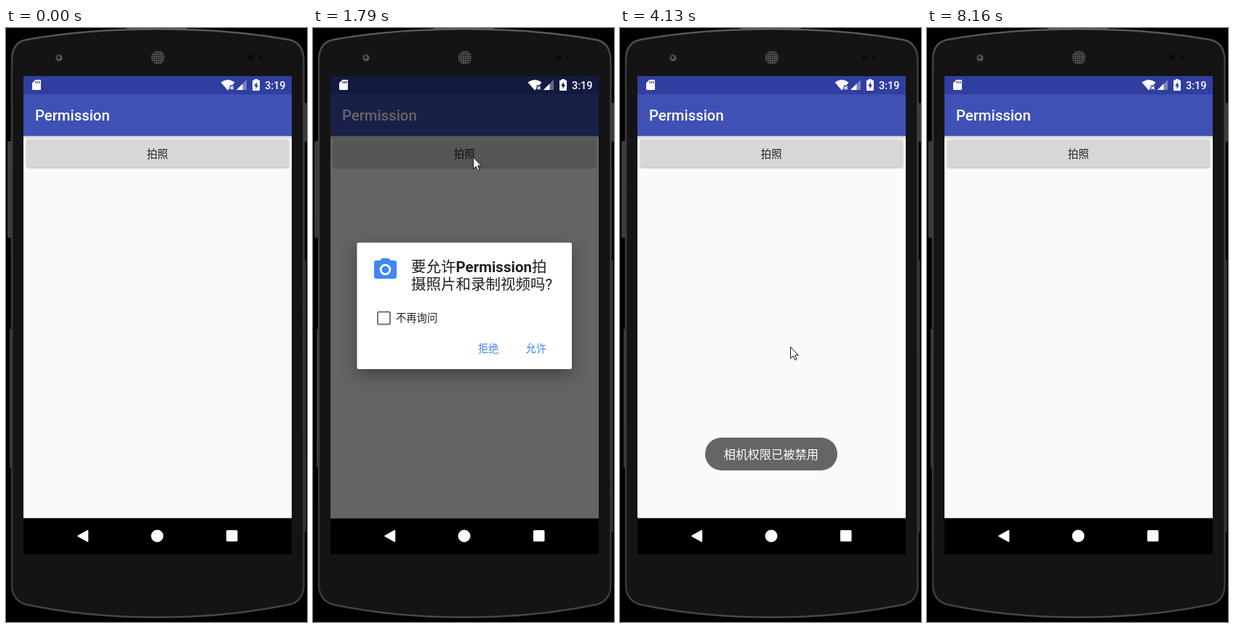
Write an HTML page that moves like this. It is 414 by 815 pixels and loops after 8.47 s.

```html
<!DOCTYPE html>
<html lang="zh-CN">
<head>
<meta charset="utf-8">
<title>Permission</title>
<style>
  html, body { margin: 0; width: 100%; height: 100%; overflow: hidden; background: #000; }
  svg { display: block; width: 414px; height: 815px; }
  text { font-family: Roboto, "Noto Sans CJK SC", "Noto Sans CJK", sans-serif; fill: #212121; }
  .medium { font-weight: 500; }
  .center { text-anchor: middle; }
  .white { fill: #fff; }
  .blue { fill: #4285f4; }
  .small { font-size: 14.3px; }
  .heading { font-size: 20.5px; }
  .toast text { font-size: 16.3px; fill: #fff; }
  .toast rect { fill: #656565; }
  .shadow { filter: drop-shadow(0 1px 1px rgba(0, 0, 0, .3)); }
  #lift { filter: drop-shadow(0 2px 2px rgba(0, 0, 0, .4)); }
  #dialog .sheet { filter: drop-shadow(0 8px 11px rgba(0, 0, 0, .34)); }
</style>
</head>
<body>
<svg viewBox="0 0 414 815">
  <defs>
    <linearGradient id="fall" x2="0" y2="1">
      <stop stop-opacity=".22"/><stop offset="1" stop-opacity="0"/>
    </linearGradient>
    <linearGradient id="rim" x2="0" y2="1">
      <stop stop-color="#5a5a5a"/><stop offset=".06" stop-color="#3e3e3e"/>
      <stop offset=".94" stop-color="#363636"/><stop offset="1" stop-color="#484848"/>
    </linearGradient>
    <pattern id="mesh" width="3" height="3" patternUnits="userSpaceOnUse">
      <rect width="3" height="3" fill="#565656"/><circle cx="1.5" cy="1.5" r="1.05" fill="#111"/>
    </pattern>
    <clipPath id="photoClip"><rect x="28" y="153" width="361" height="38" rx="2"/></clipPath>
    <clipPath id="denyClip"><rect x="212" y="421" width="58" height="36.5" rx="2"/></clipPath>
  </defs>

  <!-- phone -->
  <rect width="414" height="815"/>
  <g fill="#3a3a3a">
    <rect x="2" y="155" width="7" height="133" rx="2"/>
    <rect x="408" y="103" width="8" height="53" rx="2"/>
    <rect x="5" y="413" width="2" height="190"/>
    <rect x="411" y="318" width="1.5" height="374"/>
    <rect x="166" width="83" height="3" fill="#555"/>
  </g>
  <path d="M8 765V44Q8 20 28 16Q110 1.5 208 1.5Q306 1.5 389 16Q409 20 409.5 44V765Q409 786 390 791Q306 808.5 208 808.5Q110 808.5 28 791Q9 786 8 765Z"
        fill="#141414" stroke="url(#rim)" stroke-width="2.5"/>
  <circle cx="73" cy="41" r="5.5" fill="#2a2a2e"/>
  <circle cx="73" cy="41" r="3.8" fill="#62647a"/>
  <circle cx="72.5" cy="40.5" r="2.2" fill="#171822"/>
  <circle cx="209" cy="40.5" r="9.5" fill="url(#mesh)"/>
  <circle cx="337" cy="40.5" r="4" fill="#0b0b0b"/>
  <circle cx="350" cy="40.5" r="2.5" fill="#0b0b0b"/>

  <!-- app -->
  <rect x="24" y="66" width="369" height="656"/>
  <rect x="24" y="148" width="369" height="524.5" fill="#fafafa"/>
  <rect x="24" y="66" width="369" height="25" fill="#303f9f"/>
  <rect x="24" y="91" width="369" height="57" fill="#3f51b5"/>
  <rect x="24" y="148" width="369" height="5" fill="url(#fall)"/>
  <text x="40" y="127" class="white medium" font-size="20.3">Permission</text>
  <rect id="lift" x="28" y="153" width="361" height="38" rx="2" fill="#999"/>
  <rect class="shadow" x="28" y="153" width="361" height="38" rx="2" fill="#d6d7d7"/>
  <circle id="photoRipple" cx="220" cy="177" clip-path="url(#photoClip)"/>
  <text x="208.3" y="178" class="center medium" font-size="14.5">拍照</text>

  <rect id="dim" x="24" y="66" width="369" height="606.5"/>

  <!-- status and navigation -->
  <g class="white" fill-rule="evenodd">
    <path d="M40.500 71H47Q48 71 48 72V84Q48 85 47 85H37Q36 85 36 84V75.500ZM40.500 73V76H41.700V73ZM43 73V76H44.200V73ZM45.500 73V76H46.700V73Z"/>
    <path d="M295.500 74.500Q305 67.500 314.500 74.500L311.500 78.500H307.500V82.500L305 85.500Z"/>
    <path d="M308.500 80L312.800 84.300M312.800 80L308.500 84.300" stroke="#fff" stroke-width="1.5"/>
    <path d="M331 71V85H317Z" opacity=".35"/>
    <path d="M325.500 76.500V85H317Z"/>
    <path d="M342 70H346V71.500H348Q349 71.500 349 72.500V85Q349 86 348 86H340Q339 86 339 85V72.500Q339 71.500 340 71.500H342ZM345 74L341 79.500H343.400V83.800L347 78H345Z"/>
    <path d="M99 697L112.500 689.500V704.500Z" stroke="#fff" stroke-width="1.5" stroke-linejoin="round"/>
    <circle cx="208" cy="697" r="8.5"/>
    <rect x="303" y="689" width="15.5" height="15.5" rx="1.5"/>
  </g>
  <text x="356" y="83.5" class="white medium" font-size="14.5">3:19</text>

  <g id="dialog">
    <rect class="sheet" x="60.5" y="294.5" width="295.5" height="173.5" rx="2" fill="#fff"/>
    <g class="blue" transform="translate(80.9 312.9) scale(1.55)">
      <rect x="2" y="4" width="20" height="16" rx="2"/>
      <path d="M7.200 4L9 2H15L16.800 4Z"/>
      <circle cx="12" cy="12" r="5" fill="#fff"/>
      <circle cx="12" cy="12" r="3.2"/>
    </g>
    <text x="135" y="334.5" class="heading">要允许<tspan font-weight="700">Permission</tspan>拍</text>
    <text x="135" y="359" class="heading">摄照片和录制视频吗?</text>
    <rect x="89" y="389.5" width="17" height="17" rx="1.5" fill="none" stroke="#757575" stroke-width="2"/>
    <text x="114" y="403" class="small">不再询问</text>
    <g clip-path="url(#denyClip)">
      <rect id="denyGlow" x="212" y="421" width="58" height="37" fill="#f5f5f5"/>
      <circle id="denyRipple" cx="234" cy="437" fill="#e7e7e7"/>
    </g>
    <text x="227" y="444.5" class="small blue">拒绝</text>
    <text x="292.5" y="444.5" class="small blue">允许</text>
  </g>

  <g id="toastA" class="toast">
    <rect x="117" y="562" width="182" height="45" rx="22.5"/>
    <text x="208" y="590.5" class="center">相机权限已被禁用</text>
  </g>
  <g id="toastB" class="toast">
    <rect x="109" y="562" width="199" height="45" rx="22.5"/>
    <text x="208.3" y="590.5" class="center">用户拒绝了相机权限</text>
  </g>

  <path id="cursor" d="M.5 .5V16.300L4.200 12.900L6.700 18.600L9.100 17.500L6.600 12H11.400Z" fill="#fff" stroke="#111528"/>
</svg>
<script>
  const LOOP = 8470, TICK = LOOP / 110;
  // Moments at which the screen starts changing again.
  const starts = [0, 390, 1000, 1470, 1640, 2560, 3260, 3490, 5760, 6840, 7700, 8160];

  const set = (id, name, value) => document.getElementById(id).setAttribute(name, value);
  const ramp = (t, from, to) => Math.min(1, Math.max(0, (t - from) / (to - from)));
  const pulse = (t, in0, in1, out0, out1) => ramp(t, in0, in1) - ramp(t, out0, out1);
  const ease = u => u < .5 ? 2 * u * u : 1 - 2 * (1 - u) ** 2;

  // Hold the picture between refreshes, allowing for uneven ticks.
  function snap(t) {
    const start = starts.filter(s => s <= t).pop();
    return start + TICK * Math.floor((t - start + 8) / TICK);
  }

  function drawCursor(t) {
    const toButton = ease(ramp(t, 390, 850));
    const settle = ramp(t, 850, 1080);
    const toDeny = ease(ramp(t, 1870, 2640));
    const leave = ease(ramp(t, 6800, 8083));
    const x = 316 - 96 * toButton + 14 * toDeny + 149 * leave;
    const y = 555 - 373 * toButton - 5 * settle + 260 * toDeny + 358 * leave;
    set("cursor", "transform", `translate(${Math.round(x)} ${Math.round(y)})`);
    set("cursor", "opacity", t >= 390 && t < 8159 ? 1 : 0);
  }

  function draw(t) {
    const opacity = {
      lift: .8 * pulse(t, 950, 1080, 1480, 1640),
      photoRipple: .06 * pulse(t, 920, 1000, 1640, 1790),
      dim: .6 * pulse(t, 1585, 1790, 3640, 3830),
      dialog: pulse(t, 1560, 1655, 3640, 3800),
      denyGlow: ramp(t, 3400, 3570),
      toastA: pulse(t, 3740, 4100, 5690, 5990),
      toastB: pulse(t, 5740, 6065, 7640, 8000)
    };
    for (const id in opacity) set(id, "opacity", opacity[id]);
    set("photoRipple", "r", 200 * ramp(t, 960, 1640));
    set("denyRipple", "r", t < 3260 ? 0 : 15 + 13 * ramp(t, 3450, 3570) + 30 * ramp(t, 3570, 3800));
    drawCursor(t);
  }

  const begin = performance.now();
  function frame() {
    draw(snap((performance.now() - begin) % LOOP));
    requestAnimationFrame(frame);
  }
  frame();
</script>
</body>
</html>
```
